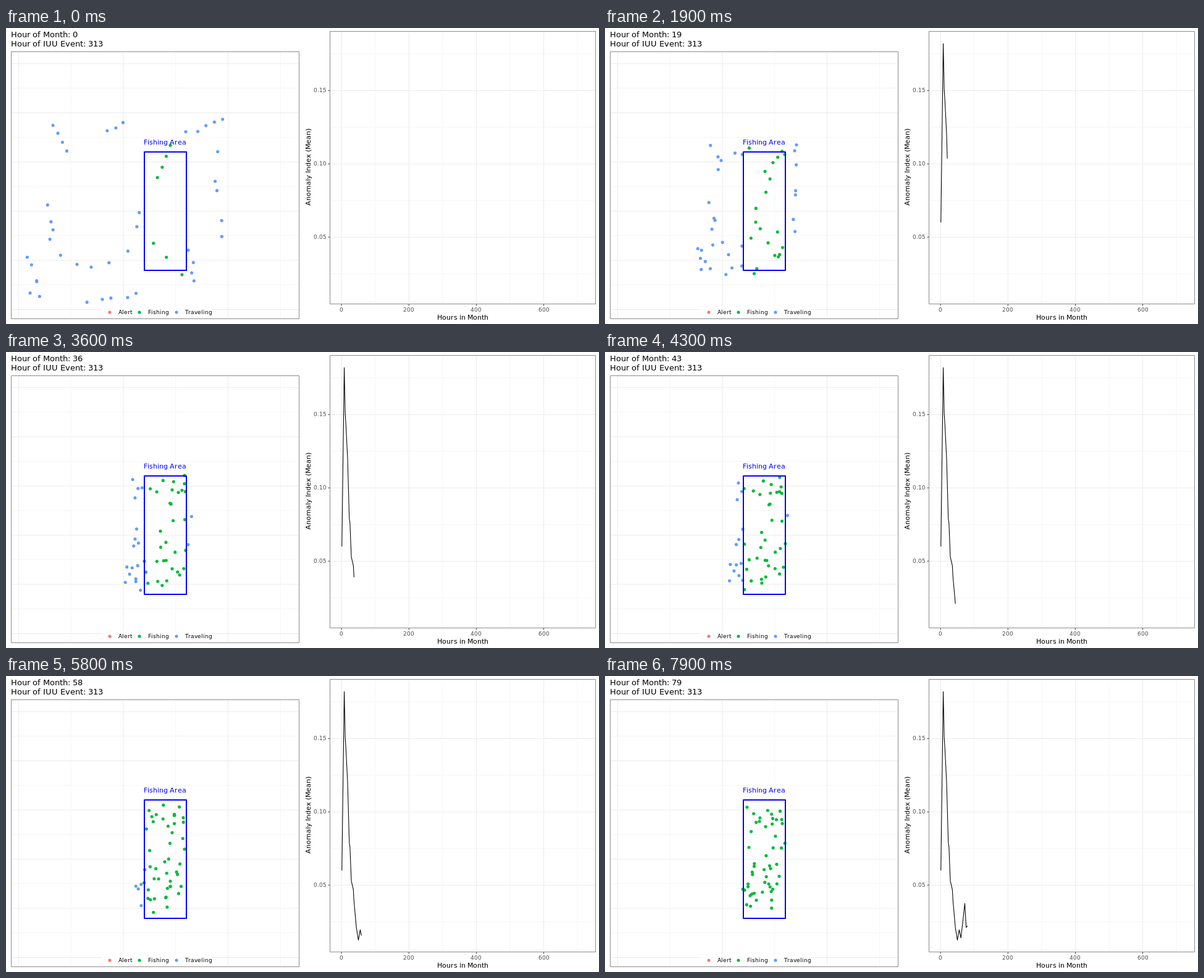
Animation of 960x480 px, one loop 8 s. Source, as an HTML page with a canvas:

```html
<!DOCTYPE html>
<html lang="en">
<head>
<meta charset="utf-8">
<title>Fleet and anomaly index</title>
<style>
html, body { margin: 0; width: 100%; height: 100%; overflow: hidden; background: #fff; }
canvas { display: block; width: 960px; height: 480px; }
</style>
</head>
<body>
<canvas id="stage" width="960" height="480"></canvas>
<script>
const ctx = document.getElementById('stage').getContext('2d');
const LOOP = 8000, STEP = 100;
const RED = '#f8766d', GREEN = '#00ba38', BLUE = '#619cff';
const MAP = { l: 8.5, t: 38.5, r: 474.5, b: 471.5 };
const CHART = { l: 524.5, t: 5.5, r: 954.5, b: 447.5 };
const AREA = { l: 224, t: 201, r: 292, b: 393 };
const APPROACH = 21; // hours for the distance to the fishing spot to fall by 1/e

let seed = 7;
function spread(size) {
  seed = (seed * 16807) % 2147483647;
  return (seed / 2147483647 * 2 - 1) * size;
}

const fleet = [];

// A loose row of ships; each heads for a spot in the area that mirrors its start
function row(count, x0, y0, x1, y1, loose) {
  for (let i = 0; i < count; i++) {
    const k = count > 1 ? i / (count - 1) : 0;
    const x = x0 + (x1 - x0) * k + spread(loose);
    const y = y0 + (y1 - y0) * k + spread(loose);
    fleet.push({
      x, y,
      homeX: 234 + (x - 29) * 0.147 + spread(9),
      homeY: 215 + (y - 139) * 0.5 + spread(12),
      phase: spread(Math.PI)
    });
  }
}

row(4, 77, 157, 98, 199, 1);
row(3, 152, 158, 193, 158, 14);
row(5, 293, 169, 354, 149, 5);
row(5, 72, 286, 80, 358, 14);
row(6, 36, 378, 51, 440, 9);
row(3, 111, 387, 162, 380, 5);
row(5, 134, 444, 213, 428, 5);
row(3, 217, 294, 200, 355, 7);
row(5, 331, 209, 355, 337, 14);
row(4, 297, 359, 308, 413, 4);
row(4, 267, 190, 246, 243, 1);
row(3, 237, 349, 285, 398, 2);

// Key points of the index curve: hour, index
const CURVE = [
  [1, 0.06], [8, 0.182], [10.8, 0.151], [13, 0.143], [18, 0.12], [23, 0.079],
  [25, 0.076], [29, 0.053], [35, 0.047], [37, 0.039], [44, 0.021], [50, 0.0125],
  [55.4, 0.0195], [60.5, 0.014], [66, 0.025], [72, 0.0375], [76, 0.0212], [80, 0.0222]
];
const chartX = hour => 543.2 + hour * 0.5455;
const chartY = index => 458 - index * 2377;

function line(x1, y1, x2, y2) {
  ctx.beginPath();
  ctx.moveTo(x1, y1);
  ctx.lineTo(x2, y2);
  ctx.stroke();
}

// Glyphs step by whole pixels; anchor is 0 for left, 0.5 for centre, 1 for right
function text(str, x, y, size, color = '#000', anchor = 0) {
  ctx.font = size + 'px "DejaVu Sans", sans-serif';
  ctx.fillStyle = color;
  const steps = [...str].map(c => Math.round(ctx.measureText(c).width));
  const width = steps.reduce((a, b) => a + b, 0);
  x = Math.round(x - width * anchor);
  [...str].forEach((c, i) => {
    ctx.fillText(c, x, y);
    x += steps[i];
  });
}

function dot(x, y, color) {
  ctx.fillStyle = color;
  ctx.beginPath();
  ctx.arc(x, y, 2.55, 0, Math.PI * 2);
  ctx.fill();
}

// Grid lines from a start value at an even gap
function grid(box, x0, dx, y0, dy, color) {
  ctx.lineWidth = 1;
  ctx.strokeStyle = color;
  for (let x = x0; x < box.r; x += dx) line(x, box.t, x, box.b);
  for (let y = y0; y < box.b; y += dy) line(box.l, y, box.r, y);
}

function outline({ l, t, r, b }, color, width) {
  ctx.strokeStyle = color;
  ctx.lineWidth = width;
  ctx.strokeRect(l, t, r - l, b - t);
}

function position(s, hour) {
  const left = Math.exp(-hour / APPROACH);
  const drift = 5 * (1 - left);
  return [
    s.homeX + (s.x - s.homeX) * left + drift * Math.sin(hour / 9 + s.phase),
    s.homeY + (s.y - s.homeY) * left + drift * Math.cos(hour / 11 + s.phase)
  ];
}

function isFishing(x, y) {
  return x > AREA.l - 1 && x < AREA.r && y > AREA.t - 12 && y < AREA.b + 8;
}

function drawMap(hour) {
  grid(MAP, 105, 169.7, 97.5, 79.75, '#f5f5f5');
  grid(MAP, 20.4, 169.6, 57.8, 79.75, '#ebebeb');
  for (const s of fleet) {
    const [x, y] = position(s, hour);
    dot(x, y, isFishing(x, y) ? GREEN : BLUE);
  }
  outline(AREA, '#00f', 2);
  text('Fishing Area', 257.5, 189, 11, '#00f', 0.5);

  ctx.fillStyle = '#fff';
  ctx.fillRect(155, 452.5, 178, 17);
  [['Alert', 168, RED], ['Fishing', 216, GREEN], ['Traveling', 276, BLUE]]
    .forEach(([name, x, color]) => {
      dot(x, 461, color);
      text(name, x + 14, 464, 9);
    });
  outline(MAP, '#8c8c8c', 1);
  text('Hour of Month: ' + hour, 8, 15, 13);
  text('Hour of IUU Event: 313', 8, 30, 13);
}

function drawCurve(end) {
  ctx.beginPath();
  CURVE.forEach(([h, v], i) => {
    if (!i) return ctx.moveTo(chartX(h), chartY(v));
    const [ph, pv] = CURVE[i - 1];
    if (ph >= end) return;
    const k = Math.min(1, (end - ph) / (h - ph));
    ctx.lineTo(chartX(ph + (h - ph) * k), chartY(pv + (v - pv) * k));
  });
  ctx.strokeStyle = '#000';
  ctx.lineWidth = 1.07;
  ctx.lineJoin = 'round';
  ctx.stroke();
}

function drawChart(hour) {
  grid(CHART, chartX(100), 109.1, 42, 118.9, '#f5f5f5');
  grid(CHART, chartX(0), 109.1, 101.5, 118.9, '#ebebeb');
  if (hour > 0) drawCurve(hour + 1);
  outline(CHART, '#8c8c8c', 1);

  ctx.strokeStyle = '#333';
  for (let h = 0; h <= 600; h += 200) {
    const x = chartX(h);
    line(x, 448, x, 450.5);
    text(String(h), x, 460, 9, '#4d4d4d', 0.5);
  }
  for (let i = 1; i <= 3; i++) {
    const y = chartY(i * 0.05);
    line(521.5, y, 524, y);
    text((i * 0.05).toFixed(2), 519, Math.round(y + 3), 9, '#4d4d4d', 1);
  }
  text('Hours in Month', 739.5, 473, 11, '#000', 0.5);
  ctx.save();
  ctx.translate(493, 226);
  ctx.rotate(-Math.PI / 2);
  text('Anomaly Index (Mean)', 0, 0, 11, '#000', 0.5);
  ctx.restore();
}

function draw(now) {
  const hour = Math.floor((now % LOOP) / STEP);
  ctx.fillStyle = '#fff';
  ctx.fillRect(0, 0, 960, 480);
  drawMap(hour);
  drawChart(hour);
}

const begin = performance.now();
function tick() {
  draw(performance.now() - begin);
  requestAnimationFrame(tick);
}
tick();
</script>
</body>
</html>
```
